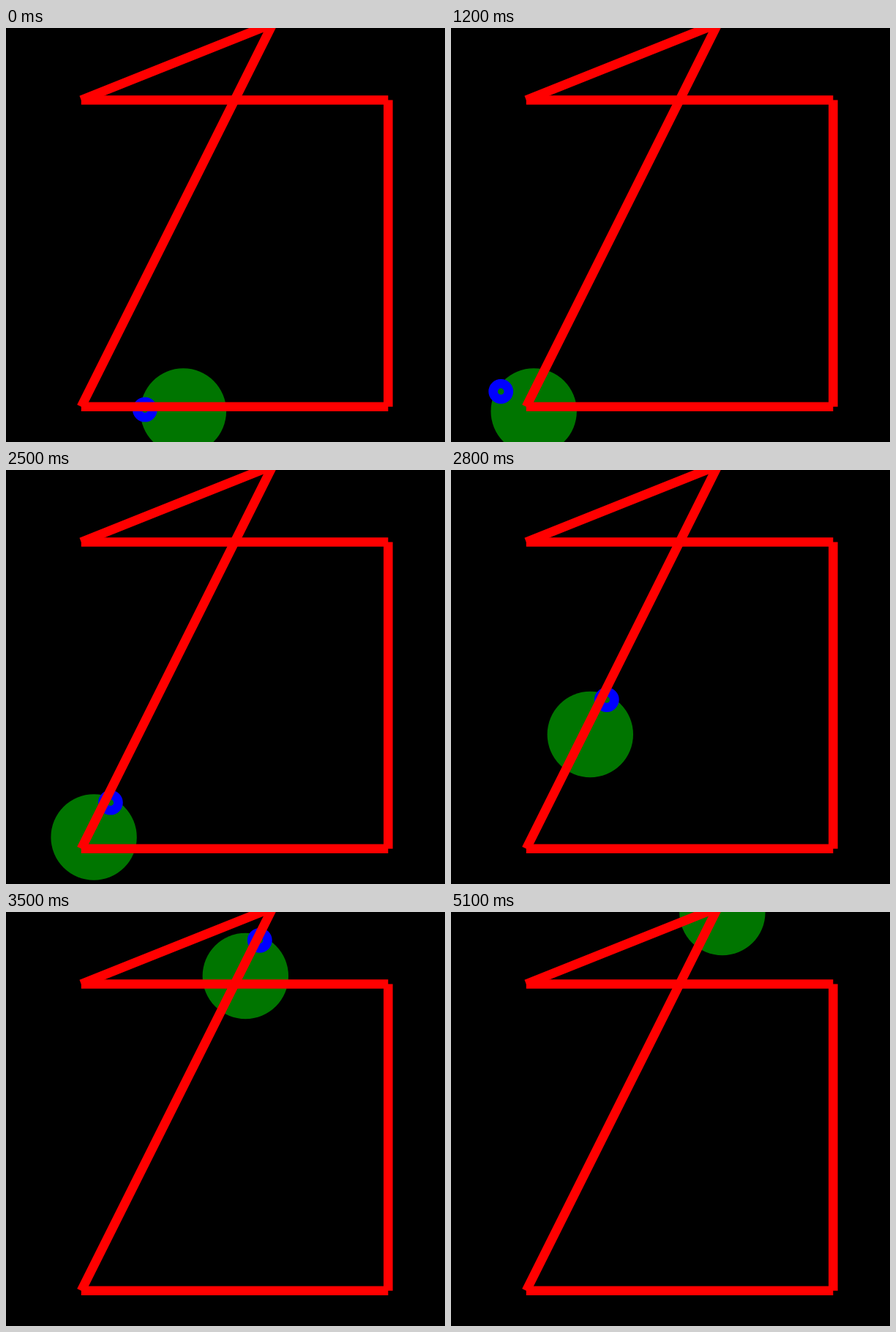
Write an HTML page with a canvas that moves like this. It is 600x566 px and loops after 5300 ms.

```html
<!DOCTYPE html>
<html lang="en">
<head>
<meta charset="utf-8">
<title>Waypoint follower</title>
<style>
  html, body { margin: 0; width: 100%; height: 100%; overflow: hidden; background: #000; }
  canvas { display: block; }
</style>
</head>
<body>
<canvas id="stage" width="600" height="566"></canvas>
<script>
const ctx = document.getElementById('stage').getContext('2d');

const LOOP = 5300, STEP = 100;
const LINE = 12.6, BODY = 58.7, ARM = 52.5, RING = 10.6;
const REST = 6.25; // the body stops this far right of and below a waypoint

const path = [
  [102.8, 98.5], [522.3, 98.5], [522.3, 517.8],
  [102.8, 517.8], [364.8, -6.2], [102.8, 98.5]
];
const [, , start, corner, apex] = path;

const TURN = 1900, GO = 2400, FIRST = -826;

// Share of a leg still to travel, ms after setting off
const remaining = ms => Math.exp(-0.043 * Math.pow(Math.max(ms, 0) / 100, 1.555));

function along(from, to, ms) {
  const left = remaining(ms);
  return from.map((v, i) => to[i] + (v - to[i]) * left + REST);
}

const aim = (p, target) => Math.atan2(target[1] - p[1], target[0] - p[0]);

function heading(p, t) {
  if (t >= GO) return aim(p, apex);
  const a = aim(p, corner);
  if (t <= TURN) return a;
  const u = (t - TURN) / (GO - TURN);
  const turn = (aim(p, apex) - a + 2 * Math.PI) % (2 * Math.PI);
  return a + turn * u * u * (3 - 2 * u);
}

function circle(x, y, r) {
  ctx.beginPath();
  ctx.arc(x, y, r, 0, 2 * Math.PI);
}

function draw(t) {
  const p = t < GO ? along(start, corner, t - FIRST) : along(corner, apex, t - GO);
  const a = heading(p, t);

  ctx.fillStyle = '#000';
  ctx.fillRect(0, 0, 600, 566);

  ctx.fillStyle = '#007500';
  circle(...p, BODY);
  ctx.fill();

  ctx.lineWidth = LINE;
  ctx.strokeStyle = '#00f';
  circle(p[0] + ARM * Math.cos(a), p[1] + ARM * Math.sin(a), RING);
  ctx.stroke();

  // Separate strokes keep the corners unjoined
  ctx.strokeStyle = '#f00';
  for (let i = 1; i < path.length; i++) {
    ctx.beginPath();
    ctx.moveTo(...path[i - 1]);
    ctx.lineTo(...path[i]);
    ctx.stroke();
  }
}

const begin = performance.now();
function tick() {
  const t = (performance.now() - begin) % LOOP;
  draw(Math.min(Math.floor(t / STEP) * STEP, LOOP - 2 * STEP));
  requestAnimationFrame(tick);
}
tick();
</script>
</body>
</html>
```
